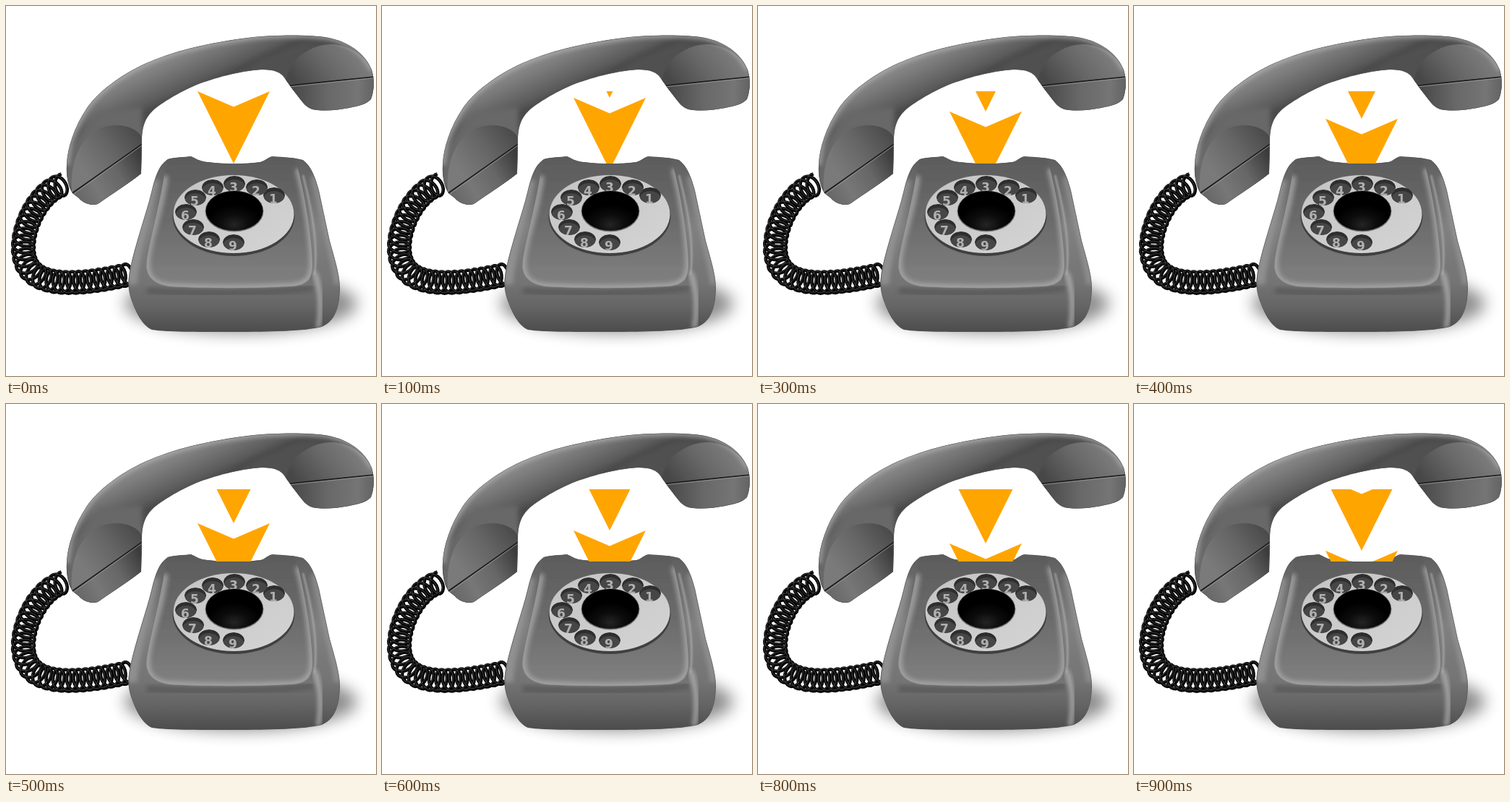
Recreate the animation shown at these times as an HTML page. Size 512 by 512 pixels, loop 1 s.

```html
<!DOCTYPE html>
<html lang="en">
<head>
<meta charset="utf-8">
<title>Telephone</title>
<style>
html, body { margin: 0; width: 100%; height: 100%; overflow: hidden; background: #fff; }
svg { display: block; width: 100vw; height: 100vh; }
text { font: bold 17px "DejaVu Sans", Verdana, sans-serif; text-anchor: middle; fill: #b0b0b0; }
</style>
</head>
<body>
<svg viewBox="0 0 512 512" fill="none">
  <defs>
    <linearGradient id="handle" gradientUnits="userSpaceOnUse" x1="245" y1="58" x2="270" y2="112">
      <stop offset="0" stop-color="#8c8c8c"/><stop offset=".4" stop-color="#747474"/>
      <stop offset=".8" stop-color="#5c5c5c"/><stop offset="1" stop-color="#4a4a4a"/>
    </linearGradient>
    <linearGradient id="earTop" gradientUnits="userSpaceOnUse" x1="478" y1="55" x2="405" y2="112">
      <stop offset="0" stop-color="#7d7d7d"/><stop offset=".5" stop-color="#666"/><stop offset="1" stop-color="#474747"/>
    </linearGradient>
    <linearGradient id="earCap" x1="0" x2="1">
      <stop offset="0" stop-color="#444"/><stop offset=".45" stop-color="#686868"/>
      <stop offset=".8" stop-color="#757575"/><stop offset="1" stop-color="#606060"/>
    </linearGradient>
    <linearGradient id="mouthTop" gradientUnits="userSpaceOnUse" x1="104" y1="222" x2="178" y2="168">
      <stop offset="0" stop-color="#7a7a7a"/><stop offset=".5" stop-color="#666"/><stop offset="1" stop-color="#4a4a4a"/>
    </linearGradient>
    <linearGradient id="mouthCap" gradientUnits="userSpaceOnUse" x1="95" y1="262" x2="187" y2="210">
      <stop offset="0" stop-color="#666"/><stop offset=".3" stop-color="#777"/>
      <stop offset=".65" stop-color="#666"/><stop offset="1" stop-color="#3c3c3c"/>
    </linearGradient>
    <linearGradient id="body" x1="0" y1="0" x2="0" y2="1">
      <stop offset="0" stop-color="#5e5e5e"/><stop offset=".4" stop-color="#808080"/>
      <stop offset=".72" stop-color="#747474"/><stop offset=".86" stop-color="#646464"/><stop offset="1" stop-color="#4c4c4c"/>
    </linearGradient>
    <linearGradient id="face" gradientUnits="userSpaceOnUse" x1="0" y1="210" x2="0" y2="392">
      <stop offset="0" stop-color="#5c5c5c"/><stop offset=".5" stop-color="#6c6c6c"/><stop offset="1" stop-color="#828282"/>
    </linearGradient>
    <linearGradient id="plate" x1="0" y1="0" x2="1" y2="1">
      <stop offset="0" stop-color="#c4c4c4"/><stop offset="1" stop-color="#d4d4d4"/>
    </linearGradient>
    <radialGradient id="knob" cx=".5" cy=".84" r=".5">
      <stop offset="0" stop-color="#242424"/><stop offset=".5" stop-color="#0c0c0c"/><stop offset="1" stop-color="#000"/>
    </radialGradient>
    <filter id="soft" x="-30%" y="-30%" width="160%" height="160%"><feGaussianBlur stdDeviation="3"/></filter>
    <filter id="fine"><feGaussianBlur stdDeviation="1"/></filter>
    <filter id="shade" x="-30%" y="-100%" width="160%" height="300%"><feGaussianBlur stdDeviation="11"/></filter>
    <path id="handsetShape" d="M84 220C85 196 94 168 112 141C128 118 158 96 192 80C234 61 285 50 342 43C374 40 425 39 451 45C480 52 499 70 506 88C510 100 510 117 505 129C500 135 490 138 475 141C460 144 440 146 424 143C412 139 408 129 397 116L387 102C381 91 371 88 354 88C322 90 288 100 264 109C240 119 214 135 203 145C190 158 188 172 188 190L187 232C168 247 145 261 127 274C118 277 107 273 101 266L92 259C86 250 83 234 84 220Z"/>
    <path id="bodyShape" d="M224 212C234 209 247 209 256 208C262 210 266 215 279 216C304 219 329 219 352 216C360 214 362 209 369 208C384 209 400 210 411 213C423 222 428 237 433 255L448 325C455 350 463 375 462 393C461 422 453 437 437 444C414 450 365 451 315 451C260 451 220 451 202 448C188 442 179 423 172 402C168 388 169 376 172 362C178 334 190 298 198 270C205 244 208 222 224 212Z"/>
    <path id="facePath" d="M222 210H400C412 250 424 325 424 358C424 378 416 387 394 388C340 391 275 391 226 388C200 384 192 370 195 352C200 318 218 255 222 210Z"/>
    <clipPath id="stage"><path d="M265 118h100v100h-100z"/></clipPath>
    <clipPath id="inHandset"><use href="#handsetShape"/></clipPath>
    <clipPath id="inBody"><use href="#bodyShape"/></clipPath>
    <clipPath id="inFace"><use href="#facePath"/></clipPath>
  </defs>

  <ellipse cx="325" cy="412" rx="161" ry="40" fill="#000" opacity=".45" filter="url(#shade)"/>
  <path id="cord" stroke="#050505" stroke-width="4.6"/>
  <path id="cordShine" stroke="#555" stroke-width=".7" transform="translate(-.8 -1)"/>

  <g clip-path="url(#inHandset)">
    <use href="#handsetShape" fill="url(#handle)"/>
    <path d="M300 120C320 80 365 70 410 50L470 55L400 130Z" fill="#555" opacity=".6" filter="url(#soft)"/>
    <path d="M80 260L84 200L130 145L188 140L190 185Z" fill="#686868" filter="url(#soft)"/>
    <path d="M91 258C88 215 102 184 128 170C152 160 180 166 188 182L188 191Z" fill="url(#mouthTop)"/>
    <path d="M387 109C388 87 402 67 428 57C452 48 476 55 491 69C503 80 507 91 509 98Z" fill="url(#earTop)"/>
    <path d="M83 266L190 190V250L125 282Z" fill="url(#mouthCap)"/>
    <path d="M390 111L512 98V148H425Z" fill="url(#earCap)"/>
    <path d="M84 220C85 196 94 168 112 141C128 118 158 96 192 80C234 61 285 50 342 43C374 40 425 39 451 45C480 52 499 70 506 88" stroke="#b0b0b0" stroke-width="7" opacity=".8" filter="url(#soft)"/>
    <path d="M89 261L188 191M388 110.500L510 98" stroke="#181818" stroke-width="1.5"/>
    <path d="M91 262L188 193M390 112L510 99.500" stroke="#999" stroke-width=".8"/>
    <use href="#handsetShape" stroke="#555" stroke-width="1"/>
  </g>

  <g clip-path="url(#inBody)">
    <use href="#bodyShape" fill="url(#body)"/>
    <path d="M205 240C196 285 180 325 174 385" stroke="#999" stroke-width="14" opacity=".75" filter="url(#soft)"/>
    <path d="M426 235C436 285 452 335 459 385" stroke="#999" stroke-width="9" opacity=".7" filter="url(#soft)"/>
    <path d="M195 394C270 399 360 398 425 390" stroke="#505050" stroke-width="9" opacity=".6" filter="url(#soft)"/>
    <use href="#facePath" fill="url(#face)" filter="url(#fine)"/>
    <g clip-path="url(#inFace)">
      <path d="M220 235C215 285 196 325 195 355C194 376 204 386 226 388C275 391 340 391 394 388C416 386 424 378 424 358C424 325 414 260 404 225" stroke="#b0b0b0" stroke-width="9" opacity=".75" filter="url(#soft)"/>
    </g>
    <path d="M427 368C434 388 438 415 432 446" stroke="#c8c8c8" stroke-width="5" opacity=".85" filter="url(#soft)"/>
    <path d="M411 234C424 285 432 330 427 372" stroke="#c0c0c0" stroke-width="2.500" opacity=".6" filter="url(#fine)"/>
    <use href="#bodyShape" stroke="#555" stroke-width="1.5" opacity=".7"/>
  </g>

  <ellipse cx="315" cy="291" rx="84.5" ry="55" fill="#404040"/>
  <ellipse cx="315" cy="288" rx="83.5" ry="54" fill="url(#plate)"/>
  <g id="dial"></g>
  <ellipse cx="316" cy="284" rx="40.500" ry="28.500" fill="#777"/>
  <ellipse cx="316" cy="283.500" rx="39.500" ry="27.500" fill="url(#knob)"/>

  <g clip-path="url(#stage)" fill="#ffa500">
    <g id="arrows">
      <path id="arrow" d="M265 118L315 139.5L365 118L315 218Z"/>
      <use href="#arrow" y="-100"/>
    </g>
  </g>
</svg>
<script>
const el = id => document.getElementById(id);

// Finger holes 1 to 9: x, y
const holes = [[371, 262], [347, 251], [316, 246], [286, 251], [262, 265],
  [249, 285], [259, 306], [281, 323], [315, 327]];
el("dial").innerHTML = holes.map(([x, y], i) => `
  <clipPath id="hole${i}"><ellipse cx="${x}" cy="${y}" rx="15" ry="11"/></clipPath>
  <g clip-path="url(#hole${i})">
    <ellipse cx="${x}" cy="${y}" rx="15" ry="11" fill="#2e2e2e"/>
    <ellipse cx="${x}" cy="${y + 3}" rx="14" ry="9" fill="#464646"/>
    <text x="${x - 1}" y="${y + 10.5}">${i + 1}</text>
  </g>`).join("");

// Coil wound around a smooth centre line
function coil() {
  const line = document.createElementNS("http://www.w3.org/2000/svg", "path");
  line.setAttribute("d", "M80 247C48 254 23 302 24 336C25 383 70 394 172 371");
  const length = line.getTotalLength(), turns = 30, steps = turns * 24;
  let d = "";
  for (let i = 0; i <= steps; i++) {
    const s = length * i / steps, a = 2 * Math.PI * turns * i / steps;
    const p = line.getPointAtLength(s);
    const from = line.getPointAtLength(Math.max(0, s - 1));
    const to = line.getPointAtLength(Math.min(length, s + 1));
    const angle = Math.atan2(to.y - from.y, to.x - from.x);
    const along = 10 * Math.sin(a), across = 15 * Math.cos(a);
    const x = p.x + along * Math.cos(angle) - across * Math.sin(angle);
    const y = p.y + along * Math.sin(angle) + across * Math.cos(angle);
    d += (i ? "L" : "M") + x.toFixed(1) + " " + y.toFixed(1);
  }
  return d;
}
const wire = coil();
el("cord").setAttribute("d", wire);
el("cordShine").setAttribute("d", wire);

function draw(now) {
  const step = Math.floor(now % 1000 / 100);
  el("arrows").setAttribute("transform", `translate(0 ${Math.round(step * 9.43)})`);
  requestAnimationFrame(draw);
}
draw(performance.now());
</script>
</body>
</html>
```
